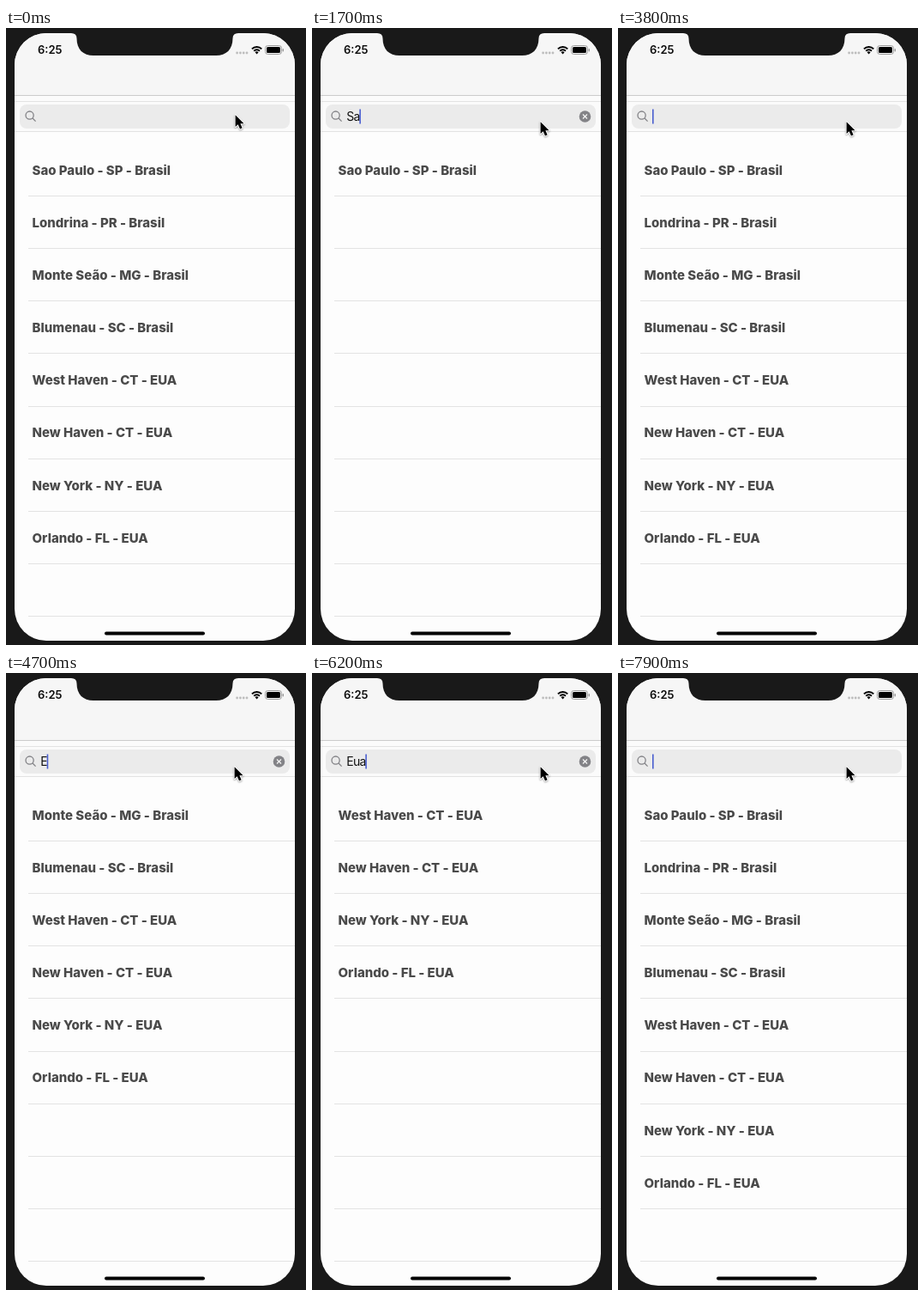
Recreate the animation shown at these times as an HTML page with a canvas. Size 350 px wide and 718 px high, loop 8 s.

```html
<!DOCTYPE html>
<html lang="pt">
<head>
<meta charset="utf-8">
<title>City search</title>
<style>
  html, body { margin: 0; width: 100%; height: 100%; overflow: hidden; background: #191919; }
  canvas { display: block; width: 350px; height: 718px; }
</style>
</head>
<body>
<canvas id="stage"></canvas>
<script>
const W = 350, H = 718, LOOP = 8000;
const canvas = document.getElementById('stage');
const c = canvas.getContext('2d');
const dpr = window.devicePixelRatio || 1;
canvas.width = W * dpr;
canvas.height = H * dpr;
c.scale(dpr, dpr);

const SANS = 'Inter, Roboto, sans-serif';
const CITIES = [
  'Sao Paulo - SP - Brasil', 'Londrina - PR - Brasil',
  'Monte Seão - MG - Brasil', 'Blumenau - SC - Brasil',
  'West Haven - CT - EUA', 'New Haven - CT - EUA',
  'New York - NY - EUA', 'Orlando - FL - EUA'
];
const ROW = 61.15;

// [time, value] steps
const QUERY = [
  [0, ''], [1300, 'S'], [1700, 'Sa'], [3100, 'S'], [3300, ''],
  [4700, 'E'], [5600, 'Eu'], [6200, 'Eua'], [7200, 'Eu'], [7300, 'E'], [7500, '']
];
const CARET = [
  [0, 0], [200, .5], [300, 1], [1000, .4], [1100, 0], [1300, 1],
  [2200, .4], [2300, 0], [2500, .4], [2600, 1], [3900, .4], [4000, 0],
  [4300, .5], [4400, 1], [5200, .4], [5300, 0], [5600, 1],
  [6700, .4], [6800, 0], [7100, .5], [7200, 1]
];

function at(steps, t) {
  let value = steps[0][1];
  for (const [start, v] of steps) if (t >= start) value = v;
  return value;
}

function rect(x, y, w, h, color) {
  c.fillStyle = color;
  c.fillRect(x, y, w, h);
}

function pill(x, y, w, h, r, color) {
  c.fillStyle = color;
  c.beginPath();
  c.roundRect(x, y, w, h, r);
  c.fill();
}

function disc(x, y, r, color) {
  c.fillStyle = color;
  c.beginPath();
  c.arc(x, y, r, 0, Math.PI * 2);
  c.fill();
}

function line(x1, y1, x2, y2) {
  c.beginPath();
  c.moveTo(x1, y1);
  c.lineTo(x2, y2);
  c.stroke();
}

function text(str, x, y, font, color, spacing = 0) {
  c.font = font + ' ' + SANS;
  c.letterSpacing = spacing + 'px';
  c.fillStyle = color;
  c.fillText(str, x, y);
  return c.measureText(str).width;
}

function notch() {
  c.fillStyle = '#191919';
  c.beginPath();
  c.moveTo(76, 5);
  c.lineTo(76, 6);
  c.quadraticCurveTo(82.5, 6, 82.5, 12);
  c.bezierCurveTo(82.5, 25, 90, 32, 102, 32);
  c.lineTo(245, 32);
  c.bezierCurveTo(257, 32, 264.5, 25, 264.5, 12);
  c.quadraticCurveTo(264.5, 6, 271, 6);
  c.lineTo(271, 5);
  c.fill();
}

function status() {
  text('6:25', 37, 30, '600 13px', '#0b0b0b');
  for (let i = 0; i < 4; i++) disc(269.6 + i * 3.8, 29, 1.4, '#bdbdbd');

  c.strokeStyle = '#000';
  c.lineWidth = 2;
  for (const r of [4.7, 8]) {
    c.beginPath();
    c.arc(292.6, 30, r, -Math.PI * .75, -Math.PI * .25);
    c.stroke();
  }
  c.fillStyle = '#000';
  c.beginPath();
  c.moveTo(292.6, 30.5);
  c.arc(292.6, 30, 2.6, -Math.PI * .78, -Math.PI * .22);
  c.fill();

  c.strokeStyle = '#9a9a9a';
  c.lineWidth = 1;
  c.beginPath();
  c.roundRect(302.5, 20.5, 19, 10, 3);
  c.stroke();
  pill(304, 22, 16, 7, 1.6, '#000');
  pill(322.6, 24, 1.4, 3.4, .7, '#9a9a9a');
}

function searchBar(query, caret) {
  rect(10, 79, 327, 41, '#fbfbfb');
  rect(10, 78, 327, 1, '#cbcbcb');
  rect(10, 85, 327, 1, '#e3e3e3');
  rect(10, 120, 327, 1, '#e3e3e3');
  pill(16, 89, 315, 28, 8, '#ebebeb');

  c.strokeStyle = '#838387';
  c.lineWidth = 1.3;
  c.beginPath();
  c.arc(27.6, 101.6, 4.6, 0, Math.PI * 2);
  c.stroke();
  line(31, 105, 34.6, 108.6);

  const width = query ? text(query, 40.3, 108, '400 14px', '#111', -.75) : 0;
  if (query) {
    disc(318.5, 103, 6.8, '#838387');
    c.strokeStyle = '#f4f4f4';
    c.lineWidth = 1.2;
    line(316, 100.5, 321, 105.5);
    line(321, 100.5, 316, 105.5);
  }
  c.globalAlpha = caret;
  rect(40 + width, 94.5, 1.6, 17, '#4a5fd0');
  c.globalAlpha = 1;
}

function list(query) {
  const key = query.toLowerCase();
  CITIES.filter(name => name.toLowerCase().includes(key)).forEach((name, i) =>
    text(name, 30.5, 170.7 + i * ROW, '800 15px', '#4a4a4a'));
  for (let i = 0; i < 9; i++) rect(26, Math.round(195 + i * ROW), 311, 1, '#e3e3e3');
}

function pointer(x, y) {
  c.save();
  c.translate(x, y);
  c.beginPath();
  c.moveTo(.6, .3);
  for (const [px, py] of [[.6, 14], [3.7, 11.2], [6, 16.4], [8.6, 15.3], [6.4, 10.2], [10.6, 10.2]]) c.lineTo(px, py);
  c.closePath();
  c.lineJoin = 'round';
  c.lineWidth = 2;
  c.strokeStyle = '#fff';
  c.shadowColor = 'rgba(0,0,0,.35)';
  c.shadowBlur = 2;
  c.shadowOffsetY = 1;
  c.stroke();
  c.shadowColor = 'transparent';
  c.fillStyle = '#000';
  c.fill();
  c.restore();
}

function draw(t) {
  const query = at(QUERY, t);
  rect(0, 0, W, H, '#191919');
  c.save();
  c.beginPath();
  c.roundRect(10, 6, 327, 707, 37);
  c.clip();
  rect(10, 6, 327, 707, '#fdfdfd');
  rect(10, 6, 327, 72, '#f6f6f6');
  searchBar(query, at(CARET, t));
  list(query);
  status();
  pill(115, 702.5, 117, 4, 2, '#000');
  c.restore();
  notch();
  const move = Math.min(3, Math.floor(t / 100)) / 3;
  pointer(267 - move, 101 + 8 * move);
}

const start = performance.now();
function tick() {
  draw((performance.now() - start) % LOOP);
  requestAnimationFrame(tick);
}
tick();
</script>
</body>
</html>
```
